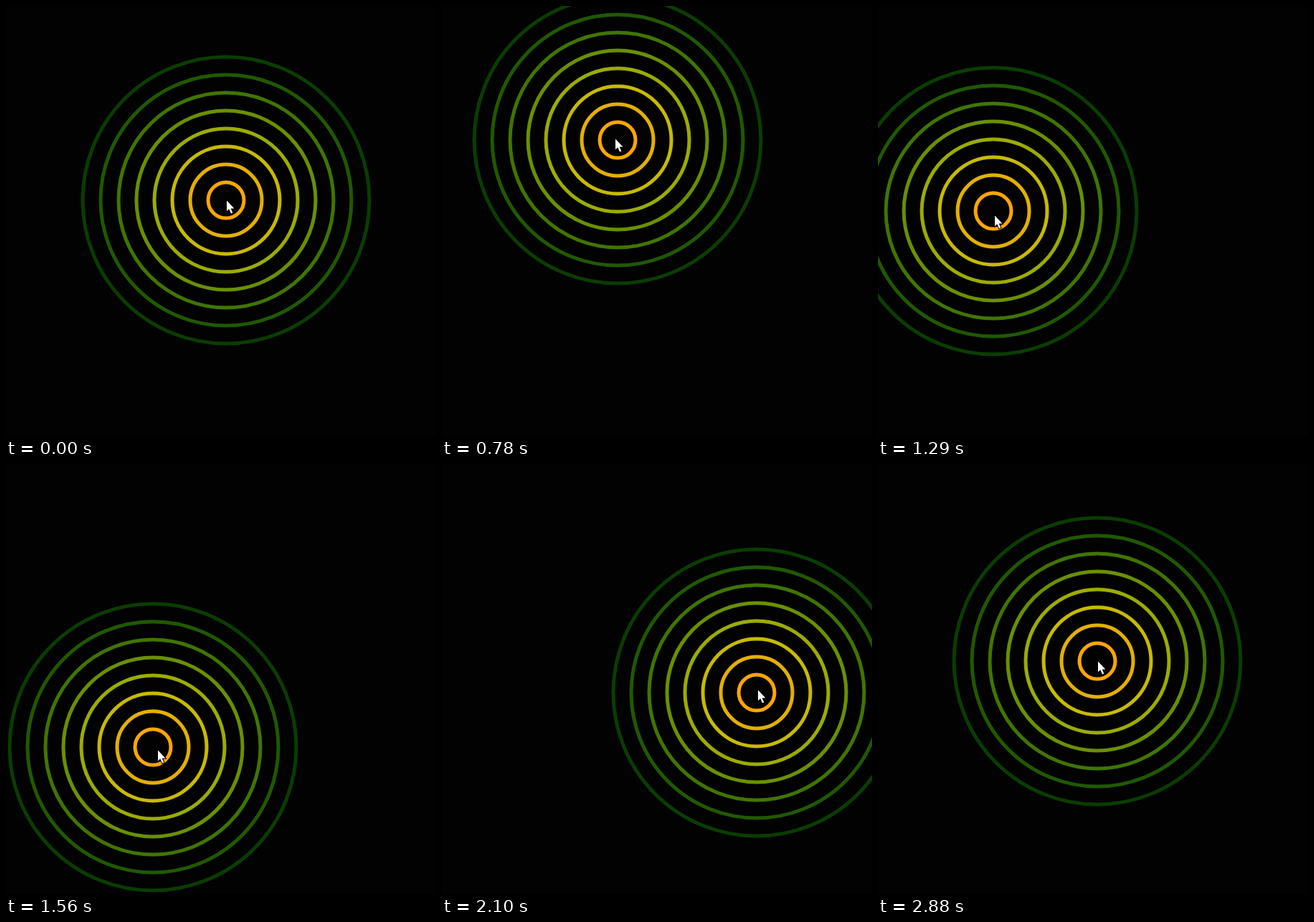
These frames come from a looping animation (600x600 px, 2910 ms). An HTML page with a canvas:

```html
<!DOCTYPE html>
<html lang="en">
<head>
<meta charset="utf-8">
<title>Rings following the pointer</title>
<style>
  html, body { margin: 0; height: 100%; overflow: hidden; background: #020202; }
  canvas { display: block; }
</style>
</head>
<body>
<canvas width="600" height="600"></canvas>
<script>
const ctx = document.querySelector('canvas').getContext('2d');
const LOOP = 2910, STEP = 30, LEAD = 16;
const RINGS = 8, SPACING = 25;

// Key points of one counter-clockwise sweep
const PATH = [
  { t: 510, x: 307, y: 271 },
  { t: 780, x: 245, y: 187 },
  { t: 1050, x: 173, y: 199 },
  { t: 1290, x: 161, y: 286 },
  { t: 1590, x: 217, y: 402 },
  { t: 1800, x: 352, y: 421 },
  { t: 2100, x: 439, y: 319 },
  { t: 2490, x: 357, y: 244 },
  { t: 2670, x: 319, y: 259 },
  { t: 2880, x: 306, y: 275 }
];
const LAST = PATH.length - 1;

const arrow = new Path2D('M0 .5V15.2L3.3 12.2 6 18.4 8.3 17.4 5.7 11.4H10.4Z');

const speed = (a, b, axis) => (b[axis] - a[axis]) / (b.t - a.t);

// Speed at a key: its neighbouring segments, the shorter one counting more
function slope(i, axis) {
  const prev = PATH[i - 1], key = PATH[i], next = PATH[i + 1];
  if (!prev) return speed(key, next, axis);
  if (!next) return speed(prev, key, axis);
  const mix = (key.t - prev.t) / (next.t - prev.t);
  return speed(prev, key, axis) * (1 - mix) + speed(key, next, axis) * mix;
}

// Smooth curve through the keys, resting before the first and after the last
function position(time) {
  const t = Math.min(Math.max(time, PATH[0].t), PATH[LAST].t);
  let i = 0;
  while (i < LAST - 1 && t > PATH[i + 1].t) i++;
  const a = PATH[i], b = PATH[i + 1], span = b.t - a.t;
  const u = (t - a.t) / span, v = 1 - u;
  return ['x', 'y'].map(axis => Math.round(
    a[axis] * v * v * (1 + 2 * u) + b[axis] * u * u * (3 - 2 * u) +
    span * u * v * (slope(i, axis) * v - slope(i + 1, axis) * u)));
}

// Bright orange in the middle to dark green outside
function ringColor(i) {
  const k = i / (RINGS - 1);
  return `hsl(${39 + 71 * k ** 1.15}, 100%, ${50 - 38 * k}%)`;
}

function draw(t) {
  ctx.fillStyle = '#020202';
  ctx.fillRect(0, 0, 600, 600);

  const [x, y] = position(t);
  ctx.lineWidth = 5;
  for (let i = 0; i < RINGS; i++) {
    ctx.strokeStyle = ringColor(i);
    ctx.beginPath();
    ctx.arc(x, y, SPACING * (i + 1), 0, 2 * Math.PI);
    ctx.stroke();
  }

  // The pointer runs slightly ahead of the rings
  const [px, py] = position(t + LEAD);
  ctx.save();
  ctx.translate(px + 1, py);
  ctx.strokeStyle = '#000';
  ctx.lineWidth = 2;
  ctx.stroke(arrow);
  ctx.fillStyle = '#fff';
  ctx.fill(arrow);
  ctx.restore();
}

const start = performance.now();
function tick() {
  const t = (performance.now() - start) % LOOP;
  draw(Math.floor(t / STEP) * STEP);
  requestAnimationFrame(tick);
}
tick();
</script>
</body>
</html>
```
